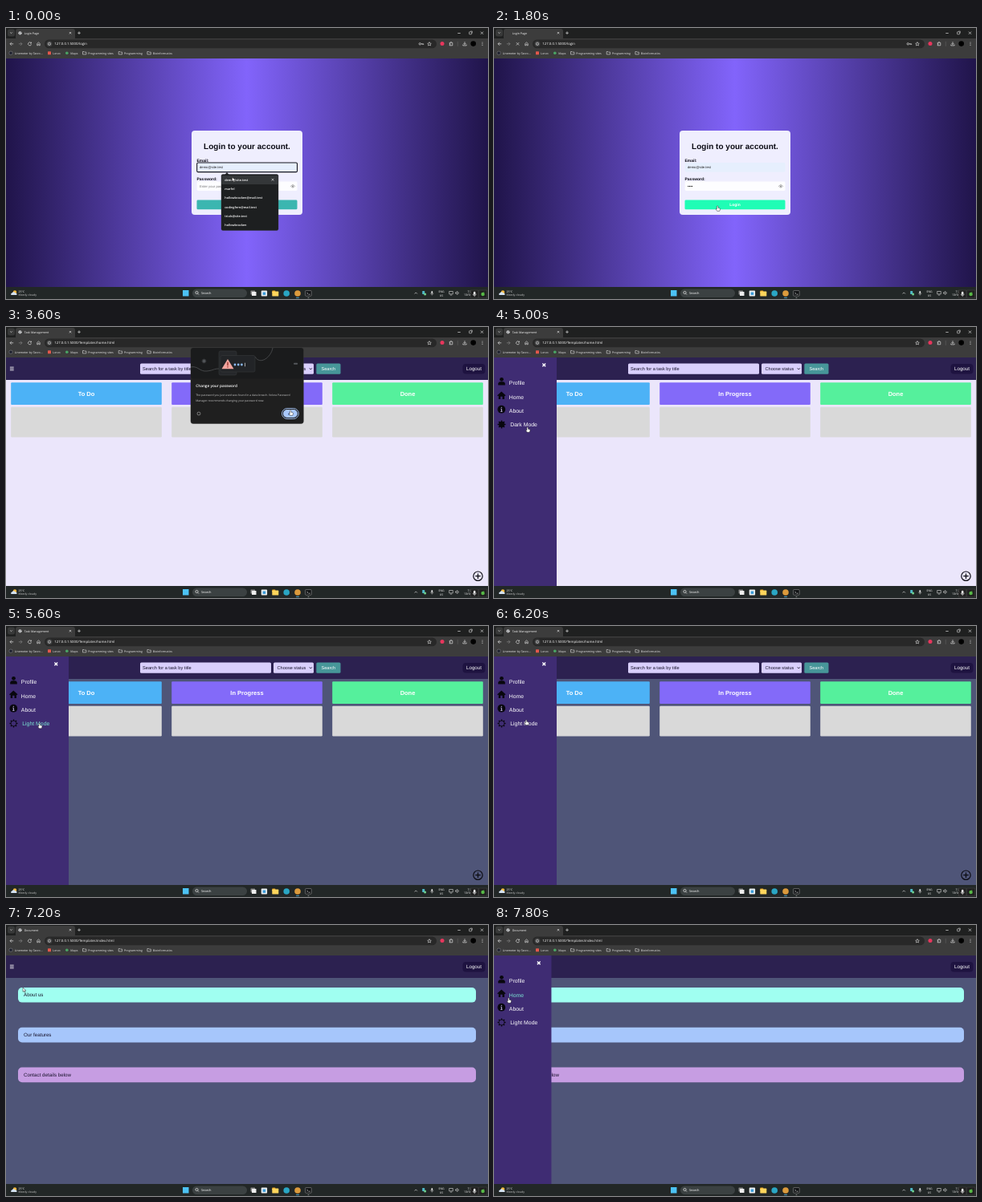
Animation of 600x338 px, one loop 8 s. Source, as an HTML page with a canvas:

```html
<!DOCTYPE html>
<html lang="en">
<head>
<meta charset="utf-8">
<title>Task manager demo</title>
<style>
html, body { margin: 0; width: 100%; height: 100%; overflow: hidden; background: #202425; }
canvas { display: block; width: 100vw; height: 100vh; }
</style>
</head>
<body>
<canvas id="stage" width="600" height="338"></canvas>
<script>
const ctx = document.getElementById('stage').getContext('2d');
const LOOP = 8000, STEP = 200;
const UI = '"Open Sans", "Noto Sans", sans-serif';
const PAGE = '"Liberation Sans", Arial, sans-serif';

// When each thing happens, in ms
const AT = { picked: 400, hoverLogin: 1400, submit: 1600, home: 2200, alert: 2800, alertEnd: 3800,
  menu: 4475, dark: 5400, minute: 6400, about: 7000, trayBack: 7200, menu2: 7475 };

// time, x, y, hand
const CURSOR = [
  [0, 281.5, 186, 0], [400, 281.5, 186, 0], [800, 292, 198, 0], [1200, 288, 206, 0], [1600, 278, 222, 1],
  [2200, 278, 222, 0], [2800, 310, 160, 0], [3400, 354, 104, 1], [3800, 354, 104, 0], [4400, 7, 51, 1],
  [5000, 41.5, 125, 1], [5400, 41.5, 121.5, 1], [6000, 41.5, 121.5, 1], [6600, 35, 105, 1],
  [7000, 35, 105, 0], [7400, 7, 51, 1], [7600, 10, 64, 1], [7800, 18, 91, 1]
];

function box(x, y, w, h, color, r = 0, border, lw = 0.8) {
  ctx.beginPath();
  ctx.roundRect(x, y, w, h, r);
  if (color) { ctx.fillStyle = color; ctx.fill(); }
  if (border) { ctx.strokeStyle = border; ctx.lineWidth = lw; ctx.stroke(); }
}

// Set large and scaled down, so tiny sizes keep their true widths
function text(s, x, y, size, { color = '#fff', weight = 400, align = 'left', font = UI } = {}) {
  ctx.save();
  ctx.translate(x, y);
  ctx.scale(0.1, 0.1);
  ctx.textRendering = 'geometricPrecision';
  ctx.font = `${weight} ${size * 10}px ${font}`;
  ctx.fillStyle = color;
  ctx.textAlign = align;
  ctx.fillText(s, 0, 0);
  ctx.restore();
}

function line(x, y, d, color = '#ddd', lw = 0.7) {
  ctx.save();
  ctx.translate(x, y);
  ctx.strokeStyle = color;
  ctx.lineWidth = lw;
  ctx.stroke(new Path2D(d));
  ctx.restore();
}

function shape(x, y, d, color) {
  ctx.save();
  ctx.translate(x, y);
  ctx.fillStyle = color;
  ctx.fill(new Path2D(d));
  ctx.restore();
}

function dot(x, y, r, color, border, lw) { box(x - r, y - r, 2 * r, 2 * r, color, r, border, lw); }

const cross = (x, y, r, color, lw) => line(x, y, `M${-r} ${-r}L${r} ${r}M${r} ${-r}L${-r} ${r}`, color, lw);

function gear(x, y, r, color, filled) {
  for (let i = 0; i < 8; i++) {
    const a = i * Math.PI / 4, c = Math.cos(a), s = Math.sin(a);
    line(x, y, `M${c * r * 0.65} ${s * r * 0.65}L${c * r} ${s * r}`, color, r * 0.3);
  }
  dot(x, y, r * 0.68, filled ? color : null, color, r * 0.14);
}

function ease(p) {
  // cubic-bezier(.25, .1, .25, 1)
  let lo = 0, hi = 1, u = 0;
  const curve = (a, b) => 3 * a * u * (1 - u) ** 2 + 3 * b * u * u * (1 - u) + u ** 3;
  for (let i = 0; i < 20; i++) {
    u = (lo + hi) / 2;
    if (curve(0.25, 0.25) < p) lo = u; else hi = u;
  }
  return curve(0.1, 1);
}

const menuWidth = (t, start) => t < start ? 0 : t >= start + 500 ? 78 : 78 * ease((t - start) / 500);

function browser(t) {
  const login = t < AT.home, loading = t >= AT.submit && t < AT.home;
  const title = login ? 'Login Page' : t < AT.about ? 'Task Management' : 'Document';
  const path = login ? 'login' : t < AT.about ? 'Templates/home.html' : 'Templates/index.html';

  box(0, 0, 600, 13, '#1f2020');
  box(2, 1.5, 9, 9, '#383939', 2.5);
  line(6.5, 6, 'M-1.3 -.6L0 .7L1.3 -.6');
  box(12, 1, 74, 14, '#3c3c3c', 3);
  if (!loading) {
    dot(17.5, 6.3, 2.1, '#d5d7da');
    line(17.5, 6.3, 'M-1.6 -.5L.2 .1L-.3 1.6M.3 -1.8L1.5 -.3', '#555', 0.6);
  }
  text(title, 22.7, 7.8, 3.6);
  cross(80, 6.2, 1.2);
  line(91, 6.2, 'M-1.8 0H1.8M0 -1.8V1.8');
  line(564, 6.5, 'M-1.7 0H1.7');
  box(576.6, 4.8, 3, 3, null, 0.4, '#ddd', 0.6);
  line(578.2, 4, 'M0 0H2.2V2.5', '#ddd', 0.5);
  cross(592.5, 6.2, 1.6);

  box(0, 13, 600, 25, '#3c3c3c');
  line(7, 19.8, 'M2.2 0H-2M0 -2L-2 0L0 2');
  line(18, 19.8, 'M-2.2 0H2M0 -2L2 0L0 2', '#858585');
  if (loading) cross(29.5, 19.8, 1.7);
  else line(29.5, 19.8, 'M1.6 -1.2A2 2 0 1 0 2 .5M2 -2.2V-.8H.5');
  line(40.5, 19.8, 'M-1.8 2V-.4L0 -2L1.8 -.4V2H.6V.3H-.6V2Z', '#ddd', 0.6);
  box(48, 14.5, 488, 10.8, '#282828', 5.4);
  dot(54, 19.8, 3.5, '#3f4041');
  dot(54, 19.8, 1.7, null, '#ddd', 0.6);
  line(54, 19.8, 'M0 -.2V1M0 -1V-.6', '#ddd', 0.6);
  text('127.0.0.1:5000/' + path, 60.3, 21.4, 4.3);
  if (login) {
    dot(515.3, 19.8, 1.2, null, '#ddd', 0.7);
    line(516.5, 19.8, 'M0 0H3.2V1.2M1.8 0V1');
  }
  line(527, 19.8, 'M0 -2.3L.7 -.7L2.3 -.5L1.1 .6L1.5 2.2L0 1.3L-1.5 2.2L-1.1 .6L-2.3 -.5L-.7 -.7Z', '#ddd', 0.6);
  dot(543, 19.6, 2.5, '#e8365d');
  line(554, 19.8, 'M-1.9 -1.4H-.5V-2.2H.6V-1.4H1.8V2H-1.9V.9H-1V-.2H-1.9Z');
  line(562.3, 19.8, 'M0 -3V3', '#6a6a6a', 0.5);
  line(571, 19.6, 'M0 -2.4V.8M-1.5 -.6L0 .9L1.5 -.6M-2.2 1V2.3H2.2V1');
  dot(581.7, 19.6, 3.3, '#000');
  [-1.7, 0, 1.7].forEach(d => dot(593, 19.7 + d, 0.5, '#ddd'));

  dot(6, 31.2, 2.2, '#1c1f2c', '#aaa', 0.4);
  box(52, 29.2, 4, 4, '#e2574c', 0.5);
  dot(75.8, 31.2, 1.8, '#4aa564');
  [['Linemeter by Tavro...', 10.7], ['Lorvo', 58.3], ['Maps', 80.2], ['Programming sites', 102.3],
    ['Programming', 147], ['Bioinformatics', 182.7]].forEach(([label, x], i) => {
    text(label, x, 32.5, 3.6, { color: '#eee' });
    if (i > 2) line(x - 4.6, 31.2, 'M-2.2 1.7V-1.7H-.6L0 -1.1H2.2V1.7Z', '#ddd', 0.6);
  });
}

function taskbar(t) {
  box(0, 323, 600, 15, '#222727');
  dot(11, 329.5, 2.2, '#f5b93e');
  shape(9.5, 332, 'M-3 1A1.6 1.6 0 0 1 -2 -1.6A2.4 2.4 0 0 1 2.4 -1.2A1.2 1.2 0 0 1 3.4 1Z', '#d5e3f2');
  text('25°C', 15.5, 329.6, 3.5);
  text('Mostly cloudy', 15.5, 334.2, 3.5, { color: '#ccc' });
  box(220, 327, 7.5, 7.5, '#4cc2f5');
  box(232, 325.4, 68, 10.6, '#3b4142', 5.3);
  dot(237.5, 330, 1.6, null, '#eee', 0.7);
  line(238.6, 331.2, 'M0 0L1.4 1.4', '#eee');
  text('Search', 243, 332.2, 4);

  box(304.5, 327.6, 5.5, 5, '#888', 0.5);
  box(306, 329, 5.5, 5, '#eee', 0.5);
  box(317.7, 327.5, 7.4, 7, '#e9eef0', 1);
  box(319.6, 329.5, 3.6, 3.4, '#3a9bd8');
  box(331.3, 327.6, 4, 3, '#e6a21e', 0.5);
  box(331.3, 328.6, 8, 6, '#ffd55c', 0.7);
  dot(349.2, 331, 3.8, '#2aa6c4');
  dot(363, 331, 3.8, '#dc9a3c');
  box(372.6, 327.6, 7.6, 6.6, '#101214', 0.7, '#aaa', 0.5);
  line(374.5, 330, 'M0 0L1.2 1L0 2M2 2.2H4', '#fff', 0.6);
  box(361, 336.2, 4, 0.8, '#5bc8f5', 0.4);
  box(375.5, 336.2, 2, 0.8, '#aaa', 0.4);

  line(510.3, 330.7, 'M-1.6 .8L0 -.8L1.6 .8');
  box(518.2, 328, 3, 4, '#4fb9c9', 0.5);
  dot(521.6, 332, 1.5, '#6fd08c');
  box(529.4, 328, 1.8, 3.3, '#ddd', 0.9);
  line(530.3, 330.7, 'M-1.6 0A1.6 1.6 0 0 0 1.6 0M0 1.6V2.7', '#ddd', 0.5);
  text('ENG', 542, 330, 3.5, { align: 'center' });
  text('US', 542, 334.5, 3.5, { align: 'center' });
  line(554, 330.5, 'M-2.3 -2H2.3V1.4H-2.3ZM-1.2 2.6H1.2', '#ddd', 0.6);
  line(561.5, 330.5, 'M-2 -.7H-1L.4 -2V2L-1 .7H-2ZM1.4 -1.2A1.7 1.7 0 0 1 1.4 1.2', '#ddd', 0.6);
  text(t < AT.minute ? '7:27 μμ' : '7:28 μμ', 587, 329.8, 3.6, { align: 'right' });
  text('13/9/2024', 587, 334.4, 3.6, { align: 'right' });

  if (t >= AT.minute && t < AT.trayBack) {
    line(592, 330.6, 'M-2 1.4L-1.3 .4V-.7A1.3 1.4 0 0 1 1.3 -.7V.4L2 1.4ZM-.6 2.2H.6', '#ddd', 0.6);
    return;
  }
  box(578.3, 327, 9.5, 9.8, '#202020', 0, '#555', 0.4);
  box(588.7, 327, 10, 9.8, '#202020', 0, '#555', 0.4);
  box(582, 328.7, 2.4, 4, '#fff', 1.2);
  line(583.2, 331.7, 'M-2 0A2 2 0 0 0 2 0M0 2V3.4', '#fff', 0.6);
  dot(593.6, 332, 2.2, '#58b947');
  line(593.6, 332, 'M0 -1L1.4 -2.7', '#58b947', 0.8);
}

function loginPage(t) {
  const g = ctx.createLinearGradient(0, 0, 600, 0);
  g.addColorStop(0, '#20144a');
  g.addColorStop(0.5, '#8264fb');
  g.addColorStop(1, '#20144a');
  box(0, 38, 600, 285, g);
  box(231, 128, 138, 105, '#efeefe', 4);

  const bold = { color: '#0b0b14', weight: 700, font: PAGE };
  text('Login to your account.', 300, 150.8, 10, { ...bold, align: 'center' });
  text('Email:', 237.5, 166.7, 5, bold);
  text('Password:', 237.5, 190.2, 5, bold);

  const focus = '#16161e', dots = Math.max(0, Math.min(4, (t - 400) / STEP));
  box(237.7, 168, 124.8, 11.6, '#e6effd', 1.4, t < AT.picked ? focus : null, 1.1);
  text('demo@site.test', 241, 175.3, 4.17, { color: '#222', font: PAGE });
  box(237.7, 191.6, 124.8, 11.4, '#fdfdff', 1.4, t >= AT.picked && t < AT.hoverLogin ? focus : null, 1.1);
  if (dots) for (let i = 0; i < dots; i++) dot(241.8 + i * 1.6, 197.4, 0.65, '#222');
  else text('Enter your password', 241, 198.8, 4.17, { color: '#777', font: PAGE });
  line(357, 197.3, 'M-2.5 0Q0 -3.4 2.5 0Q0 3.4 -2.5 0Z', '#777', 0.6);
  dot(357, 197.3, 0.9, '#777');

  box(237.5, 214.5, 125, 11.8, t < AT.hoverLogin ? '#3bb6b0' : '#1ffdb5', 1.4);
  text('Login', 300, 222.1, 5, { weight: 700, align: 'center', font: PAGE });
  if (t < AT.picked) suggestions();
}

function suggestions() {
  shape(275, 180, 'M-2.7 3L0 0L2.7 3Z', '#1d1f20');
  box(268, 182.5, 71, 70, '#1d1f20', 2, '#34373a', 0.4);
  box(268.3, 184, 70.4, 11, '#343739');
  ['demo@site.test', 'marfel', 'hollowbracken@mail.test', 'codingfern@mail.test', 'trials@site.test', 'hollowbracken']
    .forEach((s, i) => text(s, 272.2, 190.7 + i * 11.3, 3.85, { weight: 600 }));
  cross(332, 189.2, 1.4);
}

function header(withSearch) {
  box(0, 38, 600, 28, '#2c2150');
  line(7.3, 52, 'M-2.4 -1.9H2.4M-2.4 0H2.4M-2.4 1.9H2.4', '#fff', 0.8);
  box(568.5, 46, 28, 12.5, '#1e1340', 4);
  text('Logout', 582.5, 54.3, 6.2, { align: 'center', font: PAGE });
  if (!withSearch) return;
  const label = { color: '#17122a', font: PAGE };
  box(167, 45.5, 163, 13.3, '#d9cffc', 1.6);
  text('Search for a task by title', 170, 54, 5.65, label);
  box(333, 45.5, 50, 13.3, '#d9cffc', 1.6);
  text('Choose status', 337.5, 54, 5.6, label);
  line(379.3, 52.2, 'M-1.5 -.8L0 .8L1.5 -.8', '#17122a', 0.9);
  box(386.3, 45.5, 30.2, 13.3, '#479699', 1.6);
  text('Search', 401.3, 54, 5.6, { align: 'center', font: PAGE });
}

const pageColor = t => t < AT.dark ? '#ebe6fb' : '#4f5578';

function homePage(t) {
  box(0, 38, 600, 285, pageColor(t));
  header(true);
  [['To Do', '#4cb2f6'], ['In Progress', '#836af9'], ['Done', '#55f09c']].forEach(([name, color], i) => {
    const x = 6.2 + i * 200;
    box(x, 69.2, 187.6, 27.8, color, 1);
    text(name, x + 93.8, 85.6, 7.5, { weight: 700, align: 'center', font: PAGE });
    box(x, 99.7, 187.6, 37.8, '#d9d9d9', 1.2);
  });
  dot(587.5, 310.7, 5.7, null, '#0c0c12', 1.2);
  line(587.5, 310.7, 'M-3.2 0H3.2M0 -3.2V3.2', '#0c0c12', 1.2);
}

function aboutPage(t) {
  box(0, 38, 600, 285, pageColor(t));
  header(false);
  [['About us', '#a0fff1'], ['Our features', '#a6c6fb'], ['Contact details below', '#c69de2']].forEach(([s, color], i) => {
    const y = 78 + i * 49.8;
    box(15, y, 570, 18.6, color, 5);
    text(s, 22, y + 11.2, 6.2, { color: '#17122a', font: PAGE });
  });
}

function passwordAlert() {
  box(230, 26, 140.3, 94.5, '#1f1f1f', 3, '#333', 0.5);
  box(230.3, 26.3, 139.7, 38, '#1a1b1c', 3);
  line(230, 50, 'M0 0C9 -2 11 6 20 5S28 2 35 2M80 -13C86 -2 100 -12 102 -24', '#4a4c4e', 0.9);
  box(265, 30, 22, 30, '#25272a', 2, '#3a3c3f', 0.5);
  box(267, 35.5, 43, 20.5, '#222427', 2, '#3a3c3f', 0.5);
  gear(246.5, 42.5, 2.8, '#505357', true);
  box(358, 44.8, 5.2, 2, '#55585c', 1);
  shape(276, 46.3, 'M0 -6.3L7.5 6H-7.5Z', '#f2a69f');
  line(276, 46.3, 'M0 -2.5V2M0 3V4.2', '#8c1d18', 1.2);
  [285, 289.2, 293.4].forEach(x => dot(x, 47, 1.4, '#8ab8f0'));
  line(297.5, 47, 'M0 -2.3V2.3', '#ddd', 0.7);

  text('Change your password', 236.2, 75, 4.7, { weight: 600 });
  const body = { color: '#c9c9c9' };
  text('The password you just used was found in a data breach. Velora Password', 236.2, 86.3, 3.45, body);
  text('Manager recommends changing your password now.', 236.2, 92.6, 3.45, body);
  gear(240, 108, 2.5, '#a9a9a9', false);
  box(343.5, 101.5, 20.8, 13, null, 6.5, '#a8c7fa', 0.9);
  box(345, 103, 17.8, 10, '#a8c7fa', 5);
  text('OK', 353.9, 109.5, 3.8, { color: '#062e6f', weight: 600, align: 'center' });
}

function sidebar(t, w) {
  if (!w) return;
  ctx.save();
  ctx.beginPath();
  ctx.rect(0, 38, w, 285);
  ctx.clip();
  box(0, 38, 78, 285, '#3f2c73');
  cross(w - 15.7, 47.4, 1.9, '#fff', 1.3);

  const ink = '#08070d', dark = t >= AT.dark;
  dot(9.5, 65.3, 2.4, ink);
  shape(9.5, 72.5, 'M-4.3 0V-2Q-4 -4.2 -1.5 -4.2H1.5Q4 -4.2 4.3 -2V0Z', ink);
  shape(9.3, 85.5, 'M0 -5L5.2 -.2L4.4 .7L3.6 0V4.5H1.2V1.3H-1.2V4.5H-3.6V0L-4.4 .7L-5.2 -.2Z', ink);
  dot(9.3, 102.7, 4.9, ink);
  line(9.3, 102.7, 'M0 -2.9V-1.6M-.9 -.5H.1V2.6M-1.1 2.6H1.2', '#b9aedd', 1);
  gear(9.5, 121.5, 5, ink, !dark);

  const hovered = t >= 7800 ? 'Home' : t >= 6600 && t < AT.about ? 'About' : dark && t < 6200 ? 'Light Mode' : '';
  [['Profile', 72.2], ['Home', 89.8], ['About', 107.3], [dark ? 'Light Mode' : 'Dark Mode', 124]].forEach(([s, y], i) =>
    text(s, i < 3 ? 18.8 : 20.2, y, 6.9, { color: s === hovered ? '#7ce6d6' : '#fff', font: PAGE }));
  ctx.restore();
}

function cursor(t) {
  let i = CURSOR.findIndex(k => k[0] > t) - 1;
  if (i < 0) i = CURSOR.length - 1;
  const a = CURSOR[i], b = CURSOR[i + 1] || a;
  const p = b === a ? 0 : (t - a[0]) / (b[0] - a[0]), s = p * p * (3 - 2 * p);
  const x = a[1] + (b[1] - a[1]) * s, y = a[2] + (b[2] - a[2]) * s;
  const d = a[3]
    ? 'M0 0Q.8 -.4 1 .4V2.3L3 2.8Q3.7 3 3.5 4L2.8 6.3H-.3L-2 3.8Q-1.6 3 -.6 3.8V.5Q-.5 0 0 0Z'
    : 'M0 0V5.3L1.3 4.2L2.2 6.2L3.1 5.8L2.2 3.9H3.9Z';
  shape(x, y, d, '#fff');
  line(x, y, d, '#111', 0.45);
}

function draw(now) {
  const t = Math.floor(now % LOOP / STEP) * STEP;
  if (t < AT.home) loginPage(t);
  else if (t < AT.about) {
    homePage(t);
    sidebar(t, menuWidth(t, AT.menu));
  } else {
    aboutPage(t);
    sidebar(t, menuWidth(t, AT.menu2));
  }
  browser(t);
  taskbar(t);
  if (t >= AT.alert && t < AT.alertEnd) passwordAlert();
  cursor(t);
}

const start = performance.now();
function tick() {
  draw(performance.now() - start);
  requestAnimationFrame(tick);
}
tick();
</script>
</body>
</html>
```
